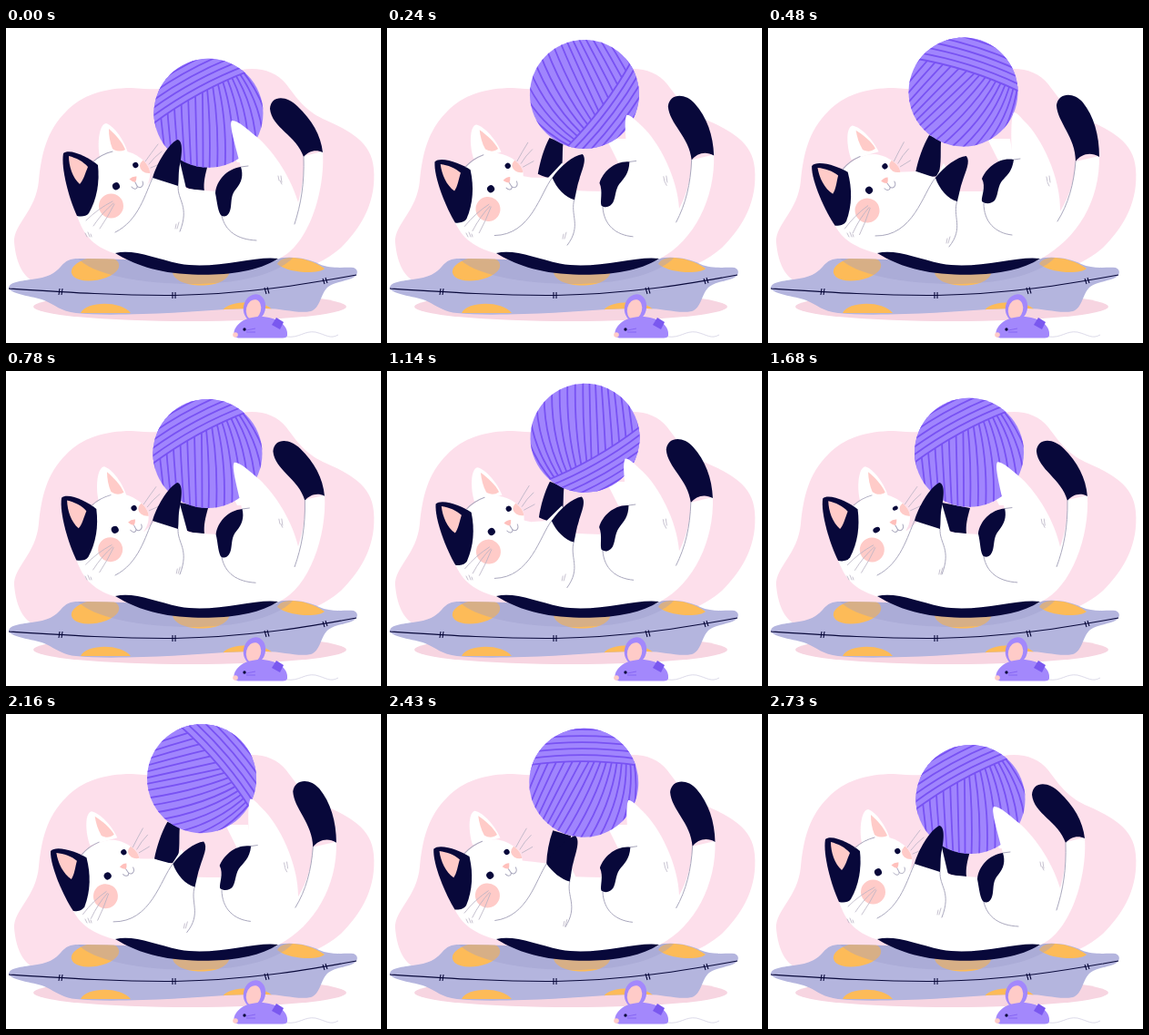
An HTML page that plays this animation: 412x347 px, repeating every 2760 ms.

```html
<!DOCTYPE html>
<html lang="en">
<head>
<meta charset="utf-8">
<title>Cat with a ball of yarn</title>
<style>
  html, body { margin: 0; width: 100%; height: 100%; overflow: hidden; background: #fff; }
  svg { display: block; width: 100%; height: 100%; }
  .line { fill: none; stroke: #a9a7bd; stroke-width: 1; stroke-linecap: round; }
  .thin { fill: none; stroke: #b9b3c4; stroke-width: .8; stroke-linecap: round; }
  .ink { fill: #08083a; }
  .white { fill: #fff; }
  .pink { fill: #ffcbc8; }
  .spot { fill: #fdbb58; }
  .seam { fill: none; stroke: #08083a; stroke-width: 1.1; }
  .yarn { fill: none; stroke: #7852f3; stroke-width: 1.8; }
</style>
</head>
<body>
<svg viewBox="0 0 412 347">
  <defs>
    <clipPath id="cushionClip"><path id="cushionShape" d="M3 287 C3 280 14 279 28 277 C46 275 54 270 60 263 C66 256 70 254 80 254 C140 254 220 262 298 254 C315 251 332 254 344 260 C358 266 372 263 382 264 C387 266 387 271 383 274 C376 279 362 279 354 285 C345 293 346 308 335 312 C320 315 305 309 285 309 C240 308 200 314 150 315 C120 316 95 316 77 314 C60 312 54 305 42 300 C28 295 8 294 3 287Z"/></clipPath>
    <clipPath id="ballClip"><circle r="60"/></clipPath>
    <clipPath id="headClip"><path id="headShape" d="M78 207 C72 185 82 158 97 147 C106 139 120 134 133 136 C145 139 157 149 158 158 C159 166 156 172 152 178 C145 198 130 216 108 226 C95 230 84 224 78 207Z"/></clipPath>
  </defs>

  <path fill="#fddfeb" d="M9 236 C8 216 33 202 36 168 C39 138 45 113 66 92 C83 74 108 66 138 66 C180 70 215 65 245 50 C268 41 294 44 308 62 C320 78 328 90 348 100 C378 113 402 126 404 155 C407 190 392 218 368 242 C352 256 332 266 305 270 L32 280 C18 274 11 258 9 236Z"/>
  <ellipse cx="202" cy="307" rx="172" ry="16" fill="#f7d5e1"/>

  <use href="#cushionShape" fill="#b4b5de"/>
  <g clip-path="url(#cushionClip)">
    <ellipse class="spot" cx="98" cy="265" rx="26.5" ry="13" transform="rotate(-10 98 265)"/>
    <path class="spot" d="M183 269 L246 268 C244 278 232 283.5 214 283.5 C198 283.5 184 278 183 269Z"/>
    <path class="spot" d="M298 260 C302 250 328 250 350 265 C344 271 312 271 298 260Z"/>
    <path class="spot" d="M82 314 C88 301 126 300 137 314Z"/>
    <path class="spot" d="M238 311 C244 300 284 299 293 311Z"/>
    <path fill="#9e9dcb" fill-opacity=".4" d="M76 250 C90 272 150 282 205 282 C250 282 300 273 318 250Z"/>
  </g>
  <path class="seam" d="M3 287 C65 291 125 295 185 294.5 C265 293 325 283 385 272"/>
  <path class="seam" d="M59 287 l-1 7 M62 287 l-1 7 M183 291 v7 M186 291 v7 M284 286 l2 7 M287 285.5 l2 7 M348 276 l2 6 M351 275 l2 6"/>

  <path class="white" d="M241 122 L266 122 L270 148 L254 148Z"/>
  <path id="farPaw" class="ink"/>
  <g id="ball">
    <circle r="60" fill="#a085fd"/>
    <g id="strands" clip-path="url(#ballClip)"></g>
  </g>

  <path id="body" class="white"/>
  <path class="ink" d="M120 248 C140 243 164 254 190 259.5 C230 267 275 250 299 254 C274 270 238 272.5 205 271.5 C165 270 140 260 120 248Z"/>
  <path id="tail" class="ink"/>
  <path id="creases" class="line"/>
  <path id="sock" class="ink"/>

  <g id="head">
    <g id="ear">
      <path class="white" d="M103 142 C100 128 102 106 110 105 C119 108 130 124 134 138Z"/>
      <path class="pink" d="M113 111 C120 117 128 126 131 134 C126 137 121 136 117 133 C114 126 113 118 113 111Z"/>
    </g>
    <use href="#headShape" class="white"/>
    <g clip-path="url(#headClip)"><ellipse cx="157" cy="152" rx="10" ry="8" class="pink"/></g>
    <path class="ink" d="M63 138 C70 132 92 143 101 151 C103 170 100 188 91 204 C88 208 82 208 78 207 C70 190 60 155 63 138Z"/>
    <path class="pink" d="M69 141 C77 143 85 147 90 153 C87 160 85 168 81 172 C73 165 69 152 69 141Z"/>
    <path class="line" d="M96 147 Q105 139 117 136"/>
    <circle cx="115.5" cy="196" r="13.5" class="pink"/>
    <path class="thin" d="M117 191 Q101 199 88 212 M118 193 Q106 203 96 218 M119 194 Q112 208 103 221 M153 147 Q160 137 167 128 M157 150 Q163 142 171 136 M159 154 L171 149"/>
    <g id="eyes" class="ink"><ellipse rx="3.1" ry="3.1"/><ellipse rx="4" ry="4"/></g>
    <path fill="#ffc0bc" d="M135.5 166.5 Q139 163 143.5 163.5 Q143.5 167 142 170 Q138 169 135.5 166.5Z"/>
    <path class="line" d="M142 170 L144 174 M138 175 C141 179 145 177 144 174 C147 178 152 174 150 169"/>
  </g>

  <path id="nearPaw" class="ink"/>
  <path id="fur" class="thin"/>

  <g>
    <path fill="none" stroke="#dddbea" d="M308 340 C322 342 328 333 340 335 C352 338 356 343 365 338"/>
    <ellipse cx="273" cy="308" rx="12" ry="15" transform="rotate(14 273 308)" fill="#a388fc"/>
    <ellipse cx="272" cy="310" rx="8" ry="11" transform="rotate(14 272 310)" class="pink"/>
    <path fill="#a388fc" d="M251 340 C248 331 258 320 273 318.5 C294 316 311 326 309 339 Q308 341.5 304 341.5 L255 341.5Z"/>
    <path fill="#7a58ef" d="M297 319 L305 324 L301 332 L292 327Z"/>
    <circle cx="252" cy="338" r="2.8" class="pink"/>
    <circle cx="262" cy="332" r="1.7" class="ink"/>
    <path fill="none" stroke="#7a58ef" stroke-width=".7" d="M264 333 L274 331 M264 335 L274 335"/>
  </g>
</svg>

<script>
const LOOP = 2760, BEAT = 920;
const get = id => document.getElementById(id);
const clamp = x => Math.min(1, Math.max(0, x));
const smooth = x => { x = clamp(x); return x * x * (3 - 2 * x); };
const lerp = (a, b, p) => a + (b - a) * p;

// Blends two paths that share the same commands.
function mix(a, b, p) {
  const ends = b.match(/-?[\d.]+/g);
  let i = 0;
  return a.replace(/-?[\d.]+/g, n => lerp(+n, +ends[i++], p).toFixed(2));
}

// Each part: resting pose, stretched pose.
const bodyParts = {
  body: [
    'M78 205 C84 230 100 243 122 249 C160 262 190 266 215 266 C250 266 285 262 300 254 C332 240 351 180 348 136 L327 141 C328 160 325 178 321 192 C313 165 296 139 278 122 C266 112 254 101 248 102 C245 106 250 122 258 153 C246 158 234 165 231 180 L218 179 L198 177 L191 147 L161 165 L150 180 L120 150Z',
    'M74 215 C78 232 98 243 122 249 C160 262 190 266 215 266 C250 266 285 262 300 254 C340 232 365 190 364 141 L338 147 C337 165 332 185 321 202 C322 165 300 120 282 103 C278 99 274 93 270 93 C267 100 267 115 268 145 C256 143 240 160 236 180 L222 180 L210 180 L193 149 L184 165 L163 158 L110 160Z'],
  tail: [
    'M327 142 C319 118 292 110 290 89 C291 74 308 74 320 86 C336 101 346 118 348 137 C340 133 332 136 327 142Z',
    'M338 147 C338 120 318 104 317 85 C319 71 336 70 346 82 C358 97 364 118 364 142 C354 136 344 139 338 147Z'],
  sock: [
    'M258 153 C243 155 231 168 230 182 C232 192 233 204 237 207 C243 209 246 204 247 197 C248 190 247 184 253 177 C259 170 261 162 258 153Z',
    'M270 145 C254 142 240 154 235 166 C240 175 234 186 235 191 C240 195 246 193 249 190 C253 184 252 177 256 170 C261 163 268 160 270 145Z'],
  fur: [
    'M299 163 l1 5 M302 163 l1 7 M301 168 l2 4 M87 226 l2 4 M90 225 l2 5 M93 227 l1 3 M187 216 l-1 5 M190 214 l-2 7',
    'M306 164 l1 5 M309 163 l1 7 M307 170 l2 4 M87 226 l2 4 M90 225 l2 5 M93 227 l1 3 M197 232 l-1 5 M200 230 l-2 7']
};
const armParts = {
  nearPaw: [
    'M161 165 C165 150 178 128 188 123 C195 124 193 140 191 150 C189 158 190 167 189 174 C180 171 170 168 161 165Z',
    'M184 165 C194 152 208 142 218 141 C223 147 217 158 214 168 C211 176 210 184 208 191 C198 189 188 177 184 165Z'],
  farPaw: [
    'M191 145 L222 151 C219 162 217 170 218 179 C210 179 203 178 197 175 C193 167 191 156 191 145Z',
    'M177 118 L189 124 C188 136 190 146 191 152 C188 157 187 162 185 164 C177 165 169 162 162 159 C165 145 170 130 177 118Z']
};
// The far paw swaps sides, so its base is traced the same way round in both poses.
armParts.farPaw[1] = 'M177 118 L190 124 C189 136 191 148 187 163 C178 165 170 163 162 159 C165 145 170 130 177 118Z';
const armCreases = [
  'M161 165 C153 182 146 212 120 225 M189 174 C188 190 202 196 191 224',
  'M184 165 C170 182 160 230 118 229 M208 190 C202 208 216 220 199 241'];
const bodyCreases = [
  'M327 142 C328 172 324 194 317 216 M237 207 C241 224 254 233 275 234 M258 153 L266 152',
  'M338 147 C336 172 330 194 318 213 M237 193 C237 214 250 226 268 228 M270 145 L277 144'];

function windYarn() {
  let fan = '', band = '';
  for (let i = 0; i < 10; i++) {
    fan += `M${i * 5 - 4} -48 Q${i * 9 + 3} 0 ${i * 8.5 + 1} 62`;
    fan += `M${-i * 8 - 7} -42 Q${-i * 8 - 6} 5 ${-i * 6.5 - 6} 62`;
  }
  for (let i = 0; i < 6; i++) {
    const y = -22 - i * 7;
    band += `M-62 ${y + 3} Q0 ${y - 6} 62 ${y + 3}`;
  }
  get('strands').innerHTML = `<path class="yarn" d="${fan}"/>
    <g transform="rotate(-29)">
      <path fill="#a085fd" d="M-62 -19 Q0 -28 62 -19 V-70 H-62Z"/>
      <path class="yarn" d="${band}"/>
    </g>`;
}

function pose(id, [rest, stretched], p) {
  get(id).setAttribute('d', mix(rest, stretched, p));
}
function place(node, transform) { node.setAttribute('transform', transform); }

function draw(t) {
  const u = t % BEAT;
  const kick = 1 - (1 - clamp(u / 460)) ** 3;
  const fall = smooth((u - 470) / 400);
  const settle = smooth((u - 470) / 290);
  const stretch = smooth(u / 380) - fall;
  const swing = kick - settle;
  const spin = -313 * smooth(u / 400) - 47 * settle;

  for (const id in bodyParts) pose(id, bodyParts[id], stretch);
  for (const id in armParts) pose(id, armParts[id], swing);
  get('creases').setAttribute('d', mix(...bodyCreases, stretch) + mix(...armCreases, swing));

  place(get('ball'), `translate(${lerp(222.5, 214.5, stretch)} ${lerp(94, 70.5, kick - fall)}) rotate(${spin})`);
  place(get('head'), `translate(${-6.5 * stretch} ${5 * stretch}) rotate(${-9 * stretch} 115.5 196)`);
  place(get('ear'), `translate(${4 * stretch} ${-4 * stretch})`);

  const lid = Math.min(1, .1 + .9 * Math.abs(t - 1740) / 85);
  const [small, large] = get('eyes').children;
  place(small, `translate(142.3 151) rotate(-28) scale(1 ${lid})`);
  place(large, `translate(121 174.3) rotate(-28) scale(1 ${lid})`);
}

windYarn();
const start = performance.now();
function tick() {
  draw((performance.now() - start) % LOOP);
  requestAnimationFrame(tick);
}
tick();
</script>
</body>
</html>
```
